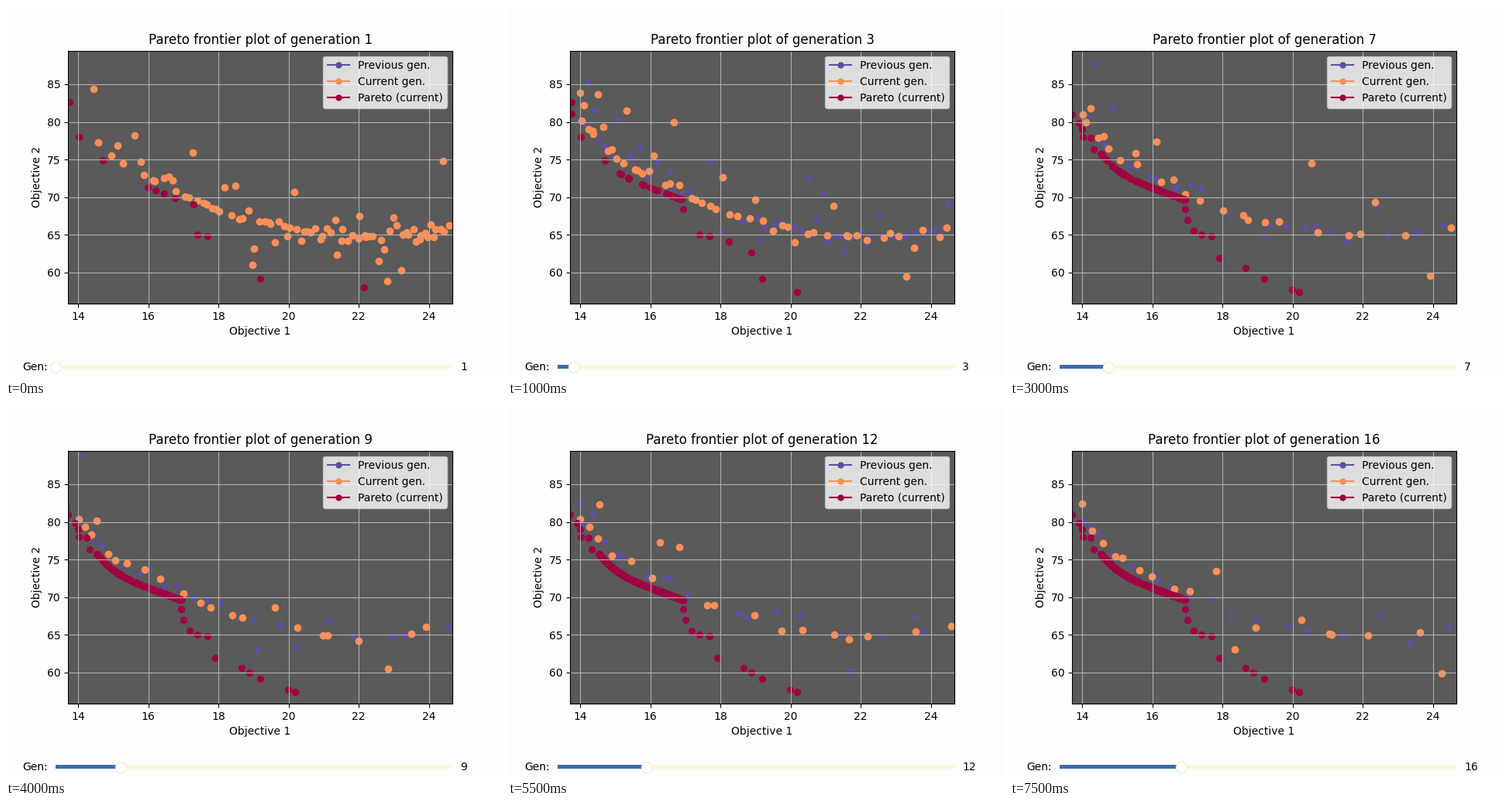
Recreate the animation shown at these times as a matplotlib script. Size 640 by 480 pixels, loop 8 s.

```python
import numpy as np
import matplotlib.pyplot as plt
from matplotlib.animation import FuncAnimation
from matplotlib.lines import Line2D
from matplotlib.patches import Rectangle

GENS, LAST_GEN, STEP_MS = 16, 50, 500
PREV, CURR, BEST = "#5e4fa2", "#fb8f56", "#a00142"

# Key solutions away from the knee, by the generation that finds them
KEYS = {
    1: [(13.75, 82.6), (14.01, 78), (17.28, 69), (17.41, 65),
        (17.68, 64.8), (19.18, 59.2), (22.15, 58)],
    2: [(13.76, 81.1), (16.94, 68.4), (18.23, 64.1), (18.88, 62.7),
        (20.18, 57.4)],
    4: [(13.71, 81), (13.9, 79.9), (14.0, 79), (14.24, 77.9), (14.33, 76.4),
        (17.01, 67), (17.17, 65.5), (17.92, 62), (18.66, 60.6), (19.98, 57.7)],
    8: [(18.88, 60)],
}
TREND = [(13.7, 82), (15, 75), (17, 70.2), (18.2, 67.8), (19.6, 66.4),
         (21, 65), (23, 64.8), (25, 66.5)]


def knee(g):
    """Solutions found on the bend of the front, denser at its low end."""
    d = 2.4 * np.random.default_rng(g).random(4 + 2 * g) ** 1.4
    return list(zip(16.93 - d, 69.65 + 1.7 * d + 0.026 * d ** 5))


def front(g):
    """Non-dominated part of everything found up to generation g."""
    pool = [p for k in range(1, g + 1) for p in KEYS.get(k, []) + knee(k)]
    best, low = [], np.inf
    for x, y in sorted(pool):
        if y < low:
            best.append((x, y))
            low = y
    return best


def offspring(g):
    """Scatter around the trend; the crowd thins out and moves left."""
    rng = np.random.default_rng(100 + g)
    n = int(18 + 70 * np.exp((1 - g) / 3))
    u = (np.arange(n) + rng.random(n)) / n
    x = 14 + 10.6 * u ** (1.6 - 0.9 * np.exp((1 - g) / 1.2))
    off = np.clip(0.8 * rng.normal(size=n) ** 3, -6, 9)
    off = np.where(x < 18, np.abs(off), off)
    return list(zip(x, np.interp(x, *zip(*TREND)) + off))


fronts = [front(g) for g in range(1, GENS + 1)]
kids = [offspring(g) for g in range(1, GENS + 1)]

fig, ax = plt.subplots(figsize=(6.4, 4.8), dpi=100, facecolor="#fdfdfe")
fig.subplots_adjust(bottom=0.2)
ax.set_facecolor("#5a5a5a")
ax.set(xlim=(13.71, 24.672), ylim=(55.88, 89.46),
       xlabel="Objective 1", ylabel="Objective 2")
ax.grid(True)
title = ax.set_title("")
prev, curr, best = [ax.scatter([], [], s=s, color=c)
                    for c, s in ((PREV, 22), (CURR, 36), (BEST, 32))]
names = ("Previous gen.", "Current gen.", "Pareto (current)")
ax.legend(handles=[Line2D([], [], color=c, marker="o", ms=5, label=n)
                   for c, n in zip((PREV, CURR, BEST), names)],
          loc="upper right")

# Slider, in pixels from the top left
ui = fig.add_axes([0, 0, 1, 1])
ui.set(xlim=(0, 640), ylim=(480, 0))
ui.axis("off")
X0, WIDTH, MID = 64, 512, 465.8
ui.add_patch(Rectangle((X0, MID - 2.4), WIDTH, 4.8, color="#f8f8dc", lw=0))
fill = ui.add_patch(Rectangle((X0, MID - 2.4), 0, 4.8, color="#3b6cb0", lw=0))
knob, = ui.plot([X0], [MID], "o", ms=10, mfc="white", mec="#f0f0d0")
ui.text(53.8, MID, "Gen:", ha="right", va="center")
value = ui.text(586.2, MID, "", ha="left", va="center")


def draw(i):
    title.set_text(f"Pareto frontier plot of generation {i + 1}")
    prev.set_offsets(kids[i - 1] + fronts[i - 1] if i else np.empty((0, 2)))
    curr.set_offsets(kids[i])
    best.set_offsets(fronts[i])
    x = WIDTH * i / (LAST_GEN - 1)
    fill.set_width(x)
    knob.set_xdata([X0 + x])
    value.set_text(str(i + 1))
    return prev, curr, best, title, fill, knob, value


anim = FuncAnimation(fig, draw, frames=GENS, interval=STEP_MS,
                     init_func=lambda: draw(0), repeat=True)
plt.show()
```
